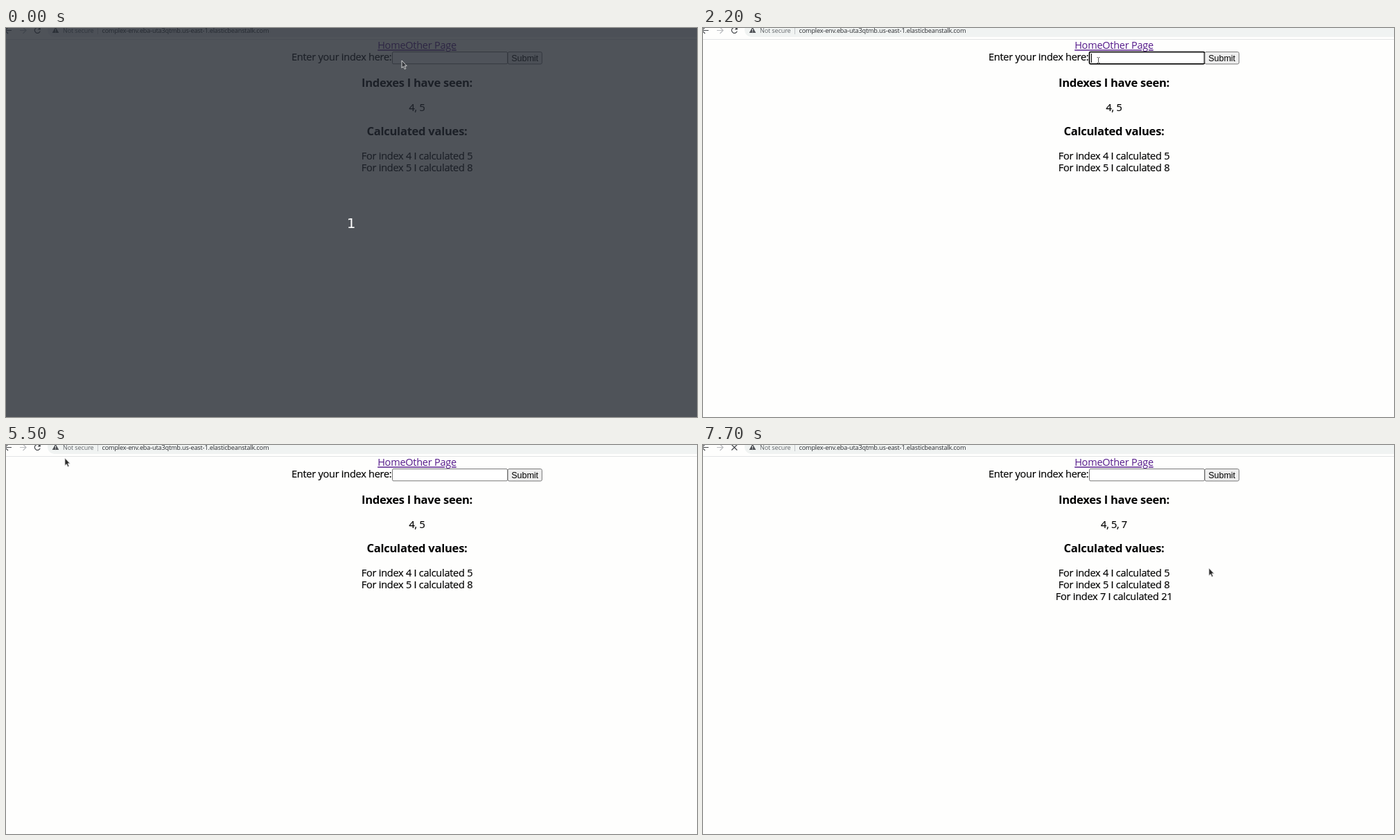
These frames come from a looping animation (997x562 px, 8000 ms). An HTML page:

```html
<!DOCTYPE html>
<html lang="en">
<head>
<meta charset="utf-8">
<title>Index calculator</title>
<style>
  html, body { margin: 0; width: 100%; height: 100%; overflow: hidden; background: #fefefd; }
  svg { display: block; width: 100vw; height: 100vh; }
  text { font: 14.5px "Open Sans", "Noto Sans", sans-serif; letter-spacing: -.017em; white-space: pre; }
  .body { stroke: #000; stroke-width: .2; }
  .mid { text-anchor: middle; }
  .head { font-size: 16.6px; font-weight: 700; }
  .bar { font-size: 9.13px; }
  .ui { font: 12.5px "Liberation Sans", Arial, sans-serif; letter-spacing: 0; }
  .link { fill: #551a8b; text-decoration: underline; }
  .count { font: 20px "DejaVu Sans", sans-serif; fill: #fff; }
  .icon { fill: none; stroke: #45484c; stroke-width: 1.2; }
</style>
</head>
<body>
<svg viewBox="0 0 997 562" preserveAspectRatio="none">
  <rect width="997" height="562" fill="#fefefd"/>

  <g id="toolbar">
    <rect x="60" y="-7" width="960" height="20" rx="10" fill="#f0f3f2"/>
    <path d="M0 16.5H997" stroke="#e2e4e5"/>
    <path class="icon" d="M8 3.5H0M3 -1L-1.5 3.5L3 8"/>
    <path class="icon" d="M20 3.5H28M24.5 -1L29 3.5L24.5 8" style="stroke:#b9bbbe"/>
    <circle id="ripple" cx="45.5" cy="3.5" r="8" fill="#eceeef"/>
    <g id="reload">
      <path class="icon" d="M48.4 .8A4 4 0 1 0 49.2 4.6"/>
      <path d="M49.8 -1.6V2.6H45.6Z" fill="#45484c"/>
    </g>
    <path id="stop" class="icon" d="M41.3 -.5L49.3 7.5M49.3 -.5L41.3 7.5"/>
    <path d="M71.5 -1.5L76.3 7H66.7Z" fill="#505357"/>
    <path d="M71.5 1.5V4M71.5 5V6" stroke="#fff"/>
    <text class="bar" x="82" y="6.5" fill="#63676b">Not secure</text>
    <path d="M132.5 -2V9" stroke="#c3c6c9"/>
    <text class="bar" x="138.5" y="6.5" fill="#27292d">complex-env.eba-uta3qtmb.us-east-1.elasticbeanstalk.com</text>
  </g>

  <g id="page">
    <text class="mid link" x="593" y="30.3">HomeOther Page</text>
    <text class="body" x="412" y="47.2">Enter your index here:</text>
    <rect id="field" x="557.5" y="34.6" width="166" height="17.2" rx="1.5" fill="#fff"/>
    <text id="typed" class="ui" x="560" y="47.5">7</text>
    <path id="caret" stroke="#000" stroke-width="1"/>
    <rect id="button" x="724" y="34.6" width="49.3" height="17.4" rx="2" stroke="#767676"/>
    <text class="mid ui" x="748.6" y="47.5">Submit</text>
    <text class="mid head" x="593" y="85">Indexes I have seen:</text>
    <text id="seen" class="mid body" x="593" y="120.2"></text>
    <text id="valuesHead" class="mid head" x="593">Calculated values:</text>
    <g id="values"></g>
  </g>

  <g id="dim">
    <rect width="997" height="562" fill="#242831" opacity=".8"/>
    <text class="mid count" x="498" y="289">1</text>
  </g>

  <path id="beam" d="M568.5 42.5H570M571 42.5H572.5M570.5 43V50M568.5 50.5H570M571 50.5H572.5" fill="none" stroke="#555"/>
  <path id="arrow" d="M0 0V10.6L2.4 8.5L4.2 12.4L5.9 11.6L4.2 7.8H7.3Z" stroke-width=".8"/>
</svg>
<script>
const LOOP = 8000, TICK = 100;
const $ = id => document.getElementById(id);
const set = (id, attrs) => {
  for (const name in attrs) $(id).setAttribute(name, attrs[name]);
};
const show = (id, on) => set(id, { visibility: on ? 'visible' : 'hidden' });

// Pointer stops: time, x, y
const stops = [
  [0, 571, 47], [3400, 571, 47], [3500, 587, 54], [3600, 640, 64], [3700, 702, 62],
  [3800, 738, 53], [4000, 747, 43], [4800, 747, 43], [4900, 725, 42], [5100, 515, 36],
  [5300, 225, 26], [5500, 85, 19], [5700, 37, 9], [5900, 42, 4], [6300, 42, 4],
  [6400, 520, 135], [6500, 520, 135], [6600, 610, 154], [6700, 690, 170],
  [6800, 730, 178], [LOOP, 730, 178]
];

const results = [[4, 5], [5, 8], [7, 21]];
const lines = results.map(([index, value], i) => {
  const line = document.createElementNS('http://www.w3.org/2000/svg', 'text');
  line.setAttribute('class', 'mid body');
  line.setAttribute('x', 593);
  line.setAttribute('y', 190.1 + 17 * i);
  line.textContent = `For index ${index} I calculated ${value}`;
  $('values').append(line);
  return line;
});

function pointerAt(t) {
  const i = stops.findIndex(stop => stop[0] > t);
  const [t0, x0, y0] = stops[i - 1], [t1, x1, y1] = stops[i];
  const k = (t - t0) / (t1 - t0);
  return [x0 + (x1 - x0) * k, y0 + (y1 - y0) * k];
}

function render(ms) {
  const t = Math.floor(ms % LOOP / TICK) * TICK;
  const within = (from, to) => t >= from && t < to;

  const dimmed = t < 100;
  const beam = within(100, 3500);
  show('dim', dimmed);
  show('beam', beam);
  show('arrow', !beam);
  const [x, y] = pointerAt(t);
  set('arrow', {
    transform: `translate(${x} ${y})`,
    fill: dimmed ? '#35383d' : '#2b2b2b',
    stroke: dimmed ? '#f4f4f4' : '#d8d8d8'
  });

  const focused = within(1000, 4600);
  const typed = within(3200, 4600);
  const caretX = typed ? 567.5 : 560.5;
  show('typed', typed);
  show('caret', within(1000, 1600) || within(2200, 2700) || within(3200, 3800) || within(4400, 4600));
  set('caret', { d: `M${caretX} 37V50` });
  set('field', { stroke: focused ? '#101010' : '#767676', 'stroke-width': focused ? 1.8 : 1 });
  set('button', { fill: within(4600, 4700) ? '#f5f5f5' : within(3900, 4900) ? '#e5e5e5' : '#efefef' });

  const loading = t >= 7000;
  show('ripple', within(6100, 7000));
  show('reload', !loading);
  show('stop', loading);

  const count = t < 7400 ? 2 : t < 7500 ? 0 : 3;
  $('seen').textContent = results.slice(0, count).map(r => r[0]).join(', ');
  set('valuesHead', { y: count ? 155 : 121 });
  lines.forEach((line, i) => line.setAttribute('visibility', i < count ? 'visible' : 'hidden'));
}

const start = performance.now();
function frame() {
  render(performance.now() - start);
  requestAnimationFrame(frame);
}
frame();
</script>
</body>
</html>
```
